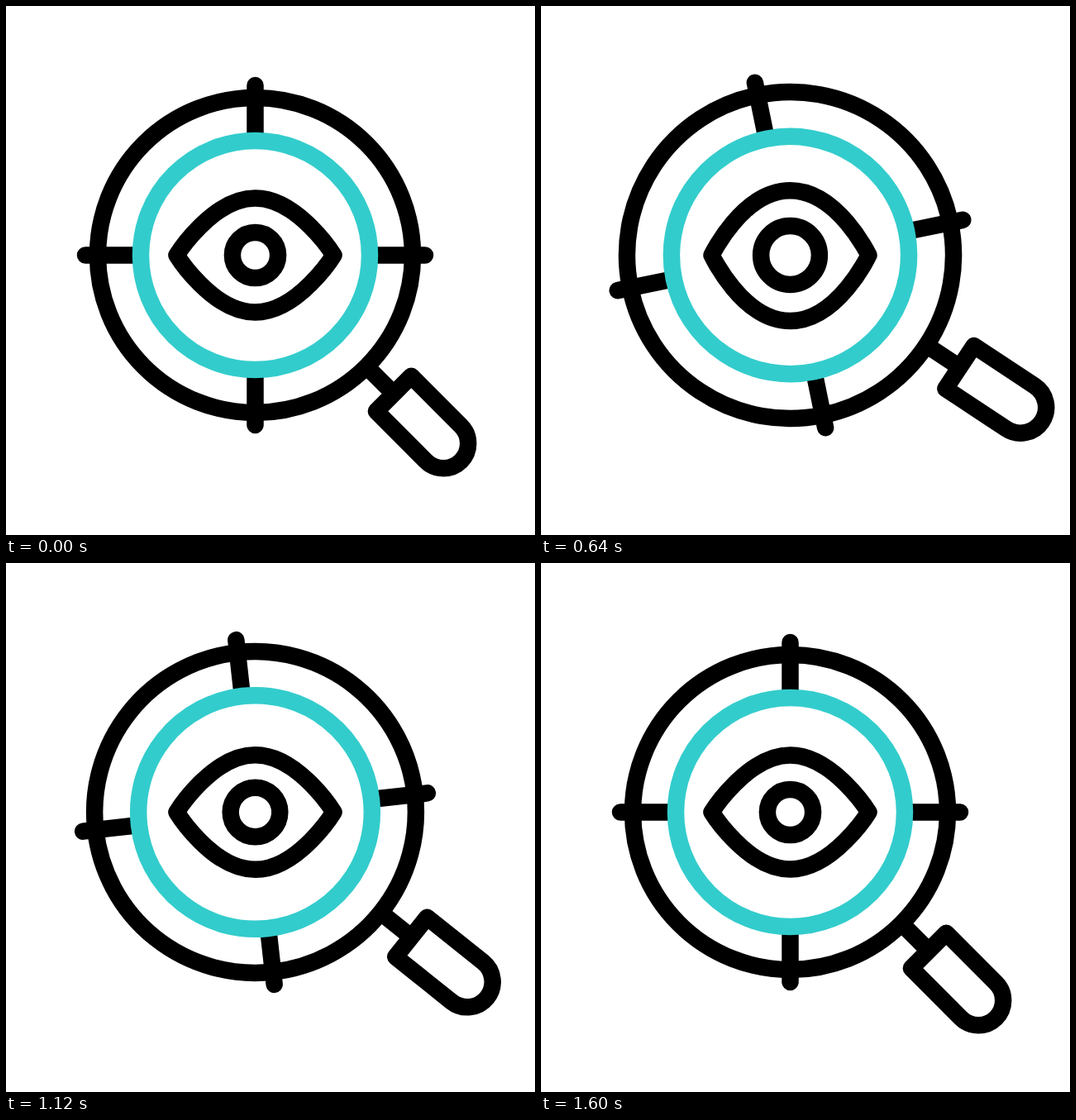
Animation, 640 px wide and 640 px high, one loop 1720 ms. Source, as an HTML page:

```html
<!DOCTYPE html>
<html lang="en">
<head>
<meta charset="utf-8">
<title>Magnifier with eye</title>
<style>
  html, body { margin: 0; width: 100%; height: 100%; overflow: hidden; background: #fff; }
  svg { display: block; width: 100%; height: 100%; }
  g { fill: none; stroke-linecap: round; stroke-linejoin: round; }
</style>
</head>
<body>
<svg viewBox="0 0 640 640">
  <g transform="translate(301.5 301.5)" stroke="#000" stroke-width="20.5">
    <g id="lens">
      <circle r="190.5"/>
      <path d="M0-140V-205.5M0 140V205.5M-140 0H-205.5M140 0H205.5"/>
      <circle r="138.5" stroke="#33cccc"/>
      <path transform="rotate(45)" d="M192 0H237M237-30H322A30 30 0 0 1 322 30H237Z"/>
    </g>
    <path id="eye"/>
    <circle id="pupil"/>
  </g>
</svg>
<script>
const LOOP = 1720, STROKE = 20.5;
const [lens, eye, pupil] = ['lens', 'eye', 'pupil'].map(id => document.getElementById(id));

// Cubic easing with control points (x1, 0) and (x2, 1), solved by bisection
function ease(x, [x1, x2]) {
  if (x <= 0 || x >= 1) return x <= 0 ? 0 : 1;
  let low = 0, high = 1, s;
  for (let i = 0; i < 24; i++) {
    s = (low + high) / 2;
    const at = 3 * x1 * s * (1 - s) ** 2 + 3 * x2 * s * s * (1 - s) + s ** 3;
    if (at < x) low = s; else high = s;
  }
  return s * s * (3 - 2 * s);
}

// Rises from 0 to 1 between start and peak, then falls back to 0 at end
function pulse(t, start, peak, end, rise, fall) {
  return t < peak
    ? ease((t - start) / (peak - start), rise)
    : 1 - ease((t - peak) / (end - peak), fall);
}

function draw(now) {
  const t = now % LOOP;
  const turn = 11.8 * pulse(t, 40, 730, 1600, [.696, .445], [.695, .195]);
  const open = pulse(t, 40, 640, 1230, [.667, .333], [.667, .333]);
  const grow = pulse(t, 40, 720, 1400, [.775, .54], [.66, .35]);

  // The lens grows as it turns while its lines keep their weight
  const scale = 1 + .0032 * turn;
  lens.setAttribute('transform', `rotate(${-turn}) scale(${scale})`);
  lens.setAttribute('stroke-width', STROKE / scale);

  const top = 69 + 9.3 * open, bottom = 69 + 10.6 * open, bend = 52 + 5.5 * open;
  eye.setAttribute('d', `M-95 0C-95 0${-bend} ${-top} 0 ${-top}S95 0 95 0` +
    `S${bend} ${bottom} 0 ${bottom}S-95 0-95 0Z`);
  pupil.setAttribute('r', 27.6 + 8 * grow);
  requestAnimationFrame(draw);
}
draw(performance.now());
</script>
</body>
</html>
```
